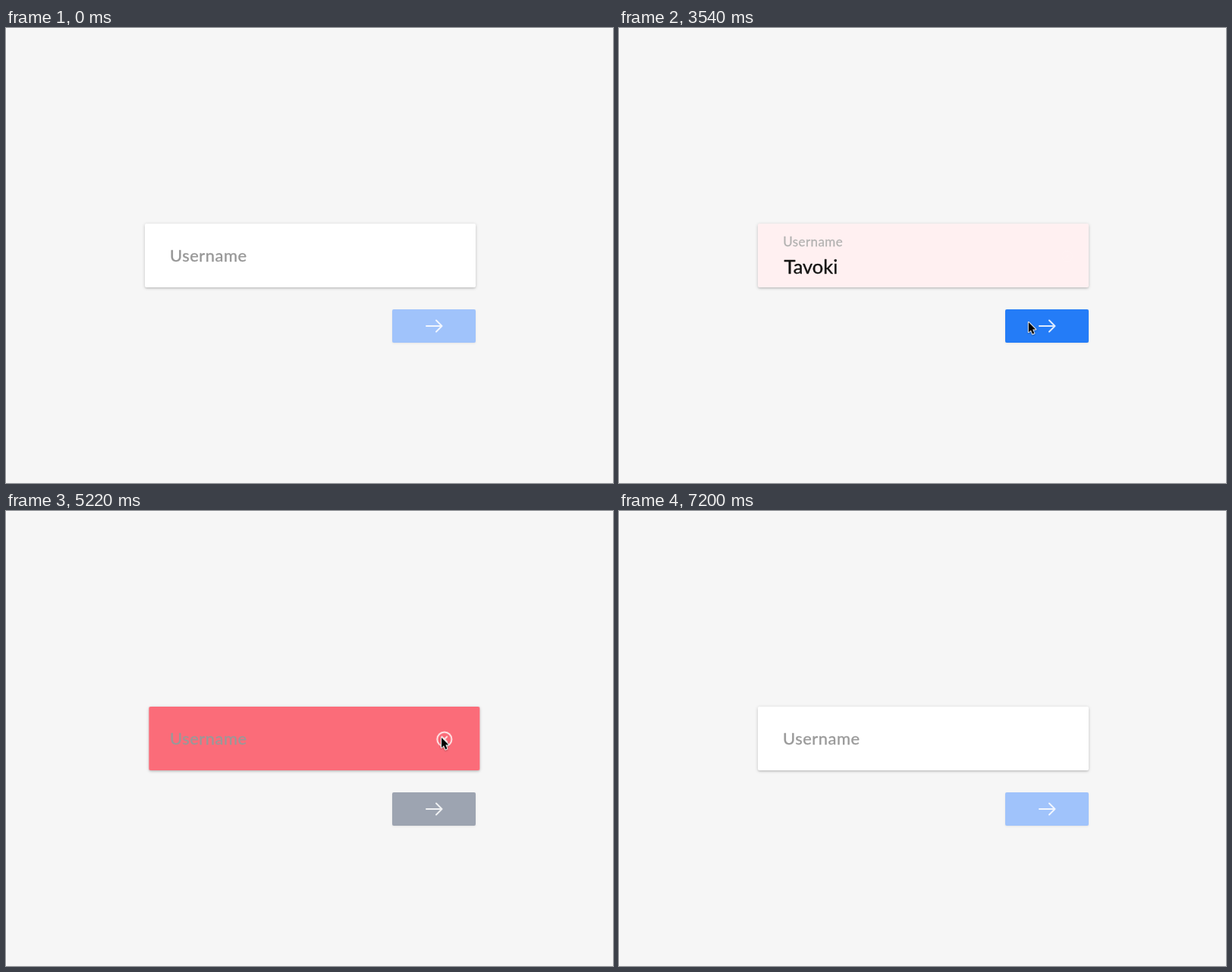
These frames come from a looping animation (800 px wide and 600 px high, 7.66 s). An HTML page:

```html
<!DOCTYPE html>
<html lang="en">
<head>
<meta charset="utf-8">
<title>Username field</title>
<style>
  html, body { margin: 0; width: 100%; height: 100%; overflow: hidden; }
  body { position: relative; background: #f6f6f6; box-shadow: inset 1px 1px #fdfdfd; }
  #panel, #button, svg { position: absolute; }
  #panel {
    left: 183px; top: 258px; width: 436px; height: 84px;
    border-radius: 2px; background: #fff;
    box-shadow: 0 1px 4px rgba(0, 0, 0, .2), 0 2px 2px rgba(0, 0, 0, .07);
  }
  #button {
    left: 509px; top: 371px; width: 110px; height: 44px;
    border-radius: 2px; background: #a0c3fb;
    box-shadow: 0 1px 3px rgba(0, 0, 0, .08);
  }
  svg { left: 0; top: 0; width: 800px; height: 600px; }
  text {
    font-family: Lato, "Open Sans", sans-serif;
    fill: currentColor; stroke: currentColor; stroke-width: .35; stroke-linejoin: round;
  }
  #label { font-size: 22px; letter-spacing: .5px; }
  #name { font-size: 25.5px; color: #000; }
  .line { fill: none; stroke: #fff; stroke-width: 2; stroke-linecap: round; stroke-linejoin: round; }
  #pointer { filter: drop-shadow(0 1px 1px rgba(0, 0, 0, .3)); }
</style>
</head>
<body>
<div id="panel"></div>
<div id="button"></div>
<svg viewBox="0 0 800 600">
  <text id="label">Username</text>
  <text id="name" x="217.5" y="324">Tavoki</text>
  <path class="line" opacity=".85" d="M554 393H574.5M567 385.5L574.5 393L567 400.5"/>
  <g id="clear">
    <g class="line" opacity=".85">
      <circle r="9.6"/>
      <path d="M-3.4 -3.4L3.4 3.4M3.4 -3.4L-3.4 3.4"/>
    </g>
  </g>
  <g id="pointer">
    <path d="M0 0V13.2L3 10.4L5.2 15.6L7.5 14.6L5.3 9.5H9.4Z"
      stroke="#fff" stroke-width="1.8" stroke-linejoin="round" paint-order="stroke"/>
  </g>
</svg>
<script>
const LOOP = 7660;
const EXPO = 'cubic-bezier(.16, 1, .3, 1)';
const at = (x, y, s = 1) => `translate(${x}px, ${y}px) scale(${s})`;

// Steps are [time in ms, value, easing towards the next step].
function play(id, prop, steps) {
  const first = steps[0], last = steps[steps.length - 1];
  const all = [[0, first[1]], ...steps, [LOOP, last[1]]];
  const frames = all.map(([t, value, easing = 'linear']) =>
    ({ offset: t / LOOP, [prop]: value, easing }));
  const run = document.getElementById(id).animate(frames, { duration: LOOP, iterations: Infinity });
  run.startTime = start;
}

const start = document.timeline.currentTime || 0;
const ERROR = 3530, ERROR_END = 4190, RESET = 5215, SHAKE = 5220;

const big = at(216, 307.5), small = at(216.3, 288.5, .775);
play('label', 'transform', [
  [1185, big, 'ease'], [1515, small], [RESET, small], [RESET, big]
]);
play('label', 'color', [
  [1185, '#969696', 'ease'], [1515, '#ababab'],
  [ERROR, '#ababab', EXPO], [ERROR_END, '#f1e4e1'],
  [RESET, '#f1e4e1'], [RESET, '#999']
]);

play('name', 'opacity', [
  [2070, 0, 'ease'], [2395, 1], [RESET, 1], [RESET, 0]
]);
play('name', 'color', [
  [ERROR, '#000', EXPO], [ERROR_END, '#cbc4be']
]);

play('panel', 'backgroundColor', [
  [ERROR, '#fff', EXPO], [ERROR_END, '#fb6a77'],
  [SHAKE, '#fb6a77', EXPO], [SHAKE + 400, '#fff']
]);
play('button', 'backgroundColor', [
  [2070, '#a0c3fb', 'ease'], [2395, '#1677ff'],
  [ERROR, '#1677ff', EXPO], [ERROR_END, '#9da4b0'],
  [SHAKE, '#9da4b0', EXPO], [SHAKE + 400, '#a0c3fb']
]);

// Damped swing of the panel after the field is cleared.
const swing = t => 177 * Math.exp(-.00688 * t) * Math.sin(Math.PI * t / 95);
const shake = [];
for (let t = 0; t < 760; t += 10) shake.push([SHAKE + t, at(swing(t).toFixed(2), 0)]);
shake.push([SHAKE + 760, at(0, 0)]);
play('panel', 'transform', shake);

const iconOut = at(592, 301, .68), iconIn = at(577.5, 301);
play('clear', 'transform', [
  [ERROR, iconOut, EXPO], [ERROR_END, iconIn],
  [SHAKE, iconIn, EXPO], [SHAKE + 300, iconOut]
]);
play('clear', 'opacity', [
  [ERROR, 0, EXPO], [ERROR_END, 1], [SHAKE, 1, EXPO], [SHAKE + 300, 0]
]);

const glide = 'ease-in-out';
play('pointer', 'transform', [
  [525, at(805, 316), glide], [795, at(499, 325.5)],
  [2725, at(499, 325.5), glide], [3135, at(539.8, 388)],
  [4325, at(539.8, 388), glide], [4815, at(574, 298.8)],
  [6305, at(574, 298.8), glide], [6545, at(805, 298.8)]
]);
</script>
</body>
</html>
```
